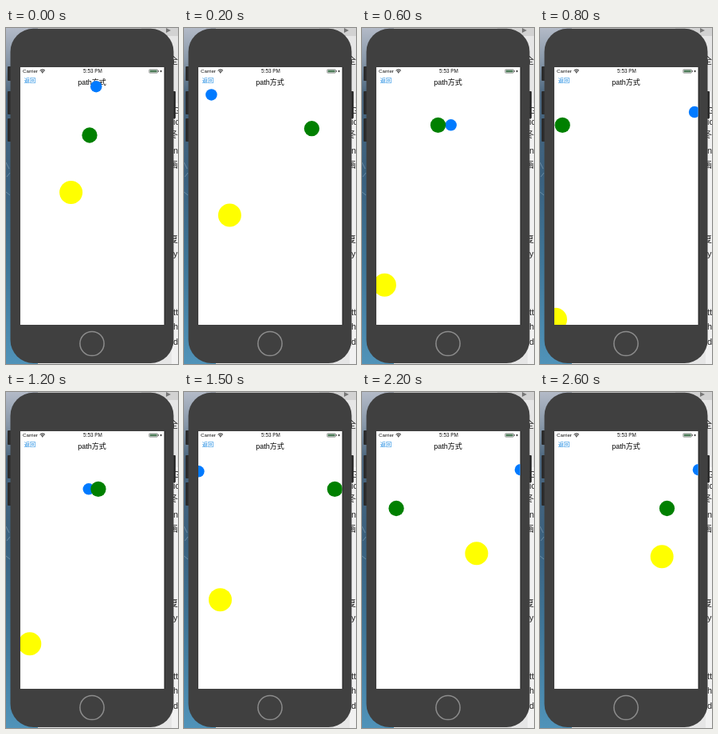
Animation of 216x420 px, one loop 2.7 s. Source, as an HTML page:

```html
<!DOCTYPE html>
<html lang="zh">
<head>
<meta charset="utf-8">
<title>path</title>
<style>
html, body { margin: 0; width: 100%; height: 100%; overflow: hidden; background: #e4e4e4; }
svg { display: block; width: 216px; height: 420px; }
text { font-family: "Liberation Sans", "Noto Sans CJK SC", "Noto Sans CJK", sans-serif; }
</style>
</head>
<body>
<svg viewBox="0 0 216 420">
  <defs>
    <linearGradient id="sea" x1="0" y1="0" x2="0" y2="1">
      <stop offset="0" stop-color="#b3bac7"/>
      <stop offset=".1" stop-color="#8797a8"/>
      <stop offset=".2" stop-color="#4a657d"/>
      <stop offset=".45" stop-color="#3a617f"/>
      <stop offset=".7" stop-color="#3f7698"/>
      <stop offset="1" stop-color="#5093b9"/>
    </linearGradient>
    <clipPath id="screen"><rect x="18" y="49" width="180.6" height="322"/></clipPath>
  </defs>

  <rect width="216" height="420" fill="#e6e6e6"/>
  <rect width="40" height="420" fill="url(#sea)"/>
  <path d="M0 168l4 8M1 186l4 -5M0 205l5 4" stroke="#9fb9ca" stroke-width=".8" opacity=".6"/>
  <rect x="170" y="0" width="46" height="10" fill="#d2d2d2"/>
  <path d="M201 0l6 3-6 3z" fill="#777"/>
  <rect x="208" y="94" width="8" height="326" fill="#f1f1f1"/>
  <g id="notes" font-size="11" fill="#222"></g>

  <g fill="#2b2b2b">
    <rect x="2" y="48" width="5" height="18" rx="1"/>
    <rect x="2" y="79" width="5" height="29" rx="1"/>
    <rect x="2" y="113" width="5" height="29" rx="1"/>
    <rect x="208" y="79" width="5" height="34" rx="1"/>
  </g>
  <rect x="5.5" y=".7" width="205" height="418.3" rx="29" fill="#404040"/>
  <rect x="198" y="49" width="1.4" height="322" fill="#111"/>
  <rect x="18" y="49" width="180.6" height="322" fill="#fff"/>
  <circle cx="108" cy="394.5" r="15.1" fill="none" stroke="#8c8c8c" stroke-width="1.5"/>

  <g fill="#111">
    <text x="21" y="56" font-size="6.2">Carrier</text>
    <text x="109" y="56" font-size="6.4" text-anchor="middle">5:53 PM</text>
    <g fill="none" stroke="#111">
      <path d="M42.6 53.2q3.2-2.7 6.4 0M43.9 54.6q1.9-1.5 3.8 0" stroke-width="1"/>
      <rect x="179.8" y="51.8" width="10.6" height="4.4" rx=".8" stroke="#555" stroke-width=".6"/>
    </g>
    <circle cx="45.8" cy="55.8" r=".8"/>
    <rect x="180.6" y="52.6" width="9" height="2.8" fill="#4c7a58"/>
    <rect x="190.9" y="53.2" width=".8" height="1.6"/>
    <path d="M193.4 54h2.4M194.6 52.8v2.4" stroke="#222" stroke-width=".9"/>
  </g>
  <text x="22.8" y="68.1" font-size="7.2" fill="#1586e0">返回</text>
  <text x="107.9" y="71.2" font-size="9" text-anchor="middle" fill="#000">path方式</text>

  <g clip-path="url(#screen)">
    <circle id="blue" r="7.25" fill="#007aff"/>
    <circle id="green" r="9.65" fill="#008000"/>
    <circle id="yellow" r="14.5" fill="#ff0"/>
  </g>
</svg>
<script>
const LOOP = 2700, STEP = 100;
const $ = id => document.getElementById(id);

// Progress along each path as [ms, value]
const blueKeys = [[0, 273], [400, 157], [800, 19], [860, 0], [1500, 175], [1900, 282], [2190, 360]];
const greenKeys = [[0, 1.522], [400, .836], [800, .003], [840, 0], [1500, 1], [1900, 1.583], [2200, 2.095], [2600, 2.815], [2700, 3]];
const yellowKeys = [[0, 1.53], [400, .836], [800, .07], [860, 0], [1500, .95], [1900, 1.58], [2200, 2.1], [2240, 2.165]];

const zigzag = [[27.7, 121.4], [189.4, 121.4], [27.7, 145.5], [189.4, 145.5]];
const mix = (a, b, k) => a + (b - a) * k;

function at(keys, t) {
  const i = keys.findIndex(k => k[0] > t);
  if (i < 0) return keys[keys.length - 1][1];
  const [t0, a] = keys[i - 1], [t1, b] = keys[i];
  return mix(a, b, (t - t0) / (t1 - t0));
}

function oval(deg) {
  const a = deg * Math.PI / 180;
  return [108.5 + 90.5 * Math.cos(a), 97.2 + 24.1 * Math.sin(a)];
}

function zig(p) {
  const i = Math.min(2, Math.floor(p)), a = zigzag[i], b = zigzag[i + 1];
  return [mix(a[0], b[0], p - i), mix(a[1], b[1], p - i)];
}

const curve = u => [
  18 + u * (21.5 + u * (-.8 + u * 9.1)),
  371 + u * (-91 + u * (-54.5 + u * 28.3))
];

function place(id, [x, y]) {
  $(id).setAttribute("cx", x);
  $(id).setAttribute("cy", y);
}

function draw(now) {
  const t = Math.floor(now % LOOP / STEP) * STEP;
  place("blue", oval(at(blueKeys, t)));
  place("green", zig(at(greenKeys, t)));
  place("yellow", curve(at(yellowKeys, t)));
}

const notes = [["全", 45], ["G", 107], ["ic", 121], ["冬", 137], ["n", 157], ["画", 175], ["复", 268], ["y", 286], ["tt", 359], ["h", 377], ["d6", 396]];
for (const [word, y] of notes) {
  const el = document.createElementNS("http://www.w3.org/2000/svg", "text");
  el.setAttribute("x", word.charCodeAt(0) > 255 ? 205 : 210);
  el.setAttribute("y", y);
  el.textContent = word;
  $("notes").append(el);
}

const start = performance.now();
function tick() {
  draw(performance.now() - start);
  requestAnimationFrame(tick);
}
tick();
</script>
</body>
</html>
```
